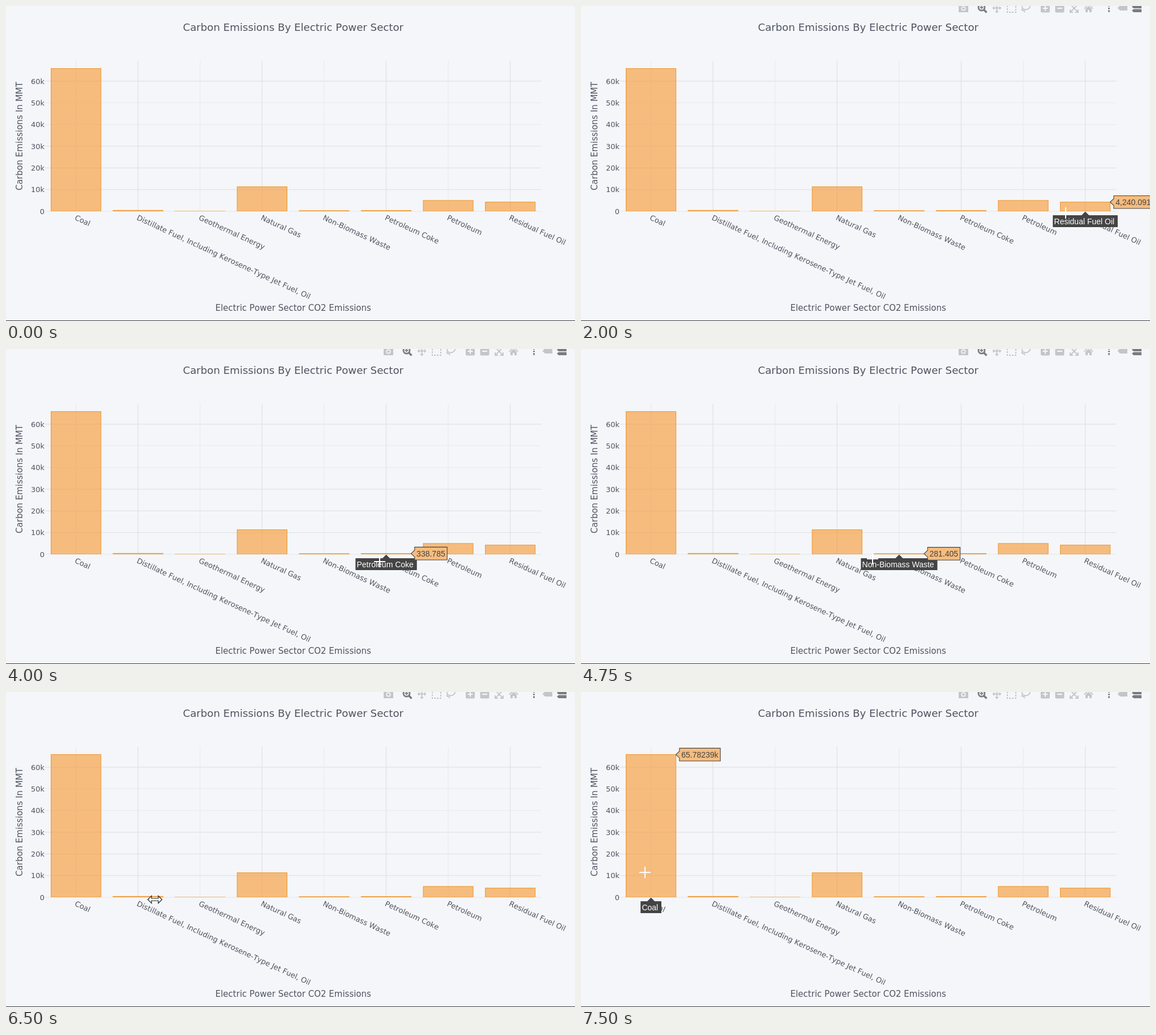
Write an HTML page that moves like this. It is 1005 px wide and 557 px high and loops after 8000 ms.

```html
<!DOCTYPE html>
<html lang="en">
<head>
<meta charset="utf-8">
<title>Carbon emissions chart</title>
<style>
  html, body { margin: 0; width: 100%; height: 100%; overflow: hidden; background: #f5f6f9; }
  svg { display: block; width: 1005px; height: 557px; }
  text { font-family: "DejaVu Sans", Verdana, sans-serif; font-kerning: none; fill: #4f5462; }
  .tick { font-size: 13px; }
  .axis { font-size: 15px; }
  .tip text { font: 14px "Liberation Sans", Arial, sans-serif; }
</style>
</head>
<body>
<svg id="stage" viewBox="0 0 1005 557">
  <clipPath id="plot"><rect x="68.7" y="97" width="876.7" height="266"/></clipPath>
  <rect width="1005" height="557" fill="#f5f6f9"/>
  <g id="grid"></g>
  <g id="bars" clip-path="url(#plot)"></g>
  <g id="labels">
    <text x="507.3" y="44" font-size="18.2" text-anchor="middle">Carbon Emissions By Electric Power Sector</text>
    <text class="axis" x="507.3" y="538.5" text-anchor="middle">Electric Power Sector CO2 Emissions</text>
    <text class="axis" transform="translate(28.8 230) rotate(-90)" text-anchor="middle">Carbon Emissions In MMT</text>
  </g>
  <rect y="556" width="1005" height="1" fill="#38393d"/>
  <g id="modebar" fill="#c4c5c9" stroke="none">
    <!-- camera -->
    <path d="M667-1h4l2-3h5l2 3h4v12h-17z"/>
    <circle cx="675.5" cy="4.5" r="3.2" fill="#c4c5c9" stroke="#f5f6f9" stroke-width="1.8"/>
    <!-- zoom -->
    <g fill="none" stroke="#7a7b80" stroke-width="2.6">
      <circle cx="707.5" cy="2.5" r="5.6"/>
      <path d="M711.5 6.5l5 5" stroke-width="3.4"/>
      <path d="M704.5 2.5h6M707.5-.5v6" stroke-width="1.8"/>
    </g>
    <!-- pan -->
    <path d="M726.5 3.5l3.5-3.5v2.5h3.5v-7h2v7h3.5v-2.5l3.5 3.5-3.5 3.5v-2.5h-3.5v4.5h2.5l-3.5 3.5-3.5-3.5h2.5v-4.5h-3.5v2.5z"/>
    <!-- box select -->
    <rect x="753" y="-5" width="15" height="16" fill="none" stroke="#c4c5c9" stroke-width="2" stroke-dasharray="3 2"/>
    <!-- lasso -->
    <path d="M780 4c-3-6 3-10 8-9 6 1 7 7 2 10-3 2-6 2-9 0-3-1-3 3 0 3 2 0 3 1 2 3" fill="none" stroke="#c4c5c9" stroke-width="1.8"/>
    <!-- zoom in, zoom out -->
    <rect x="812" y="-4" width="16" height="15.5" rx="2"/>
    <path d="M815.5 4h9M820-.5v9" stroke="#f5f6f9" stroke-width="2.2"/>
    <rect x="837.5" y="-4" width="16" height="15.5" rx="2"/>
    <path d="M841 4h9" stroke="#f5f6f9" stroke-width="2.2"/>
    <!-- autoscale -->
    <path d="M865-2l12 12M877-2l-12 12M864 6v5h5M873 11h5v-5" fill="none" stroke="#c4c5c9" stroke-width="1.8"/>
    <!-- home -->
    <path d="M888 4l8.5-8 8.5 8-1.2 1.2-7.3-6.8-7.3 6.8zM891 5l5.5-5 5.5 5v6h-4v-4h-3v4h-4z"/>
    <!-- spikes, hover modes -->
    <path d="M931-4h3v5h-3zM931 3h3v2.5h-3zM931 7.5h3v3h-3z" fill="#7a7b80"/>
    <path d="M947.5 3.5l4.5-4.5h13v9h-13z"/>
    <path d="M973 1.5l3-3h14v5.5h-14zM973 8l3-2.5h14v5.5h-14z" fill="#7a7b80"/>
  </g>
  <g id="tip" class="tip">
    <path id="nameBox" fill="#444"/>
    <text id="nameText" y="385.5" style="fill:#fff" text-anchor="middle"/>
    <path id="valueBox" fill="#f6bc7f" stroke="#444" stroke-width="1.1"/>
    <text id="valueText" style="fill:#444"/>
  </g>
  <path id="cross" d="M-10 0h20M0-10v20" fill="none" stroke="#fff" stroke-width="2"/>
  <path id="resize" d="M-12.5 0L-6-6.5V-2H6V-6.5L12.500 0 6 6.500V2H-6V6.500Z" fill="#fff" stroke="#222" stroke-width="1.2"/>
</svg>
<script>
const LOOP = 8000, LEFT = 68.7, RIGHT = 945.4, TOP = 97, BASE = 363, STEP = 109.58, HALF = 44;
const fuels = [
  ["Coal", 65782.39, "65.78239k"],
  ["Distillate Fuel, Including Kerosene-Type Jet Fuel, Oil", 404, "404.117"],
  ["Geothermal Energy", 10, "10.197"],
  ["Natural Gas", 11295.36, "11.29536k"],
  ["Non-Biomass Waste", 281, "281.405"],
  ["Petroleum Coke", 338.785, "338.785"],
  ["Petroleum", 4982.993, "4,982.993"],
  ["Residual Fuel Oil", 4240, "4,240.091"]
];

// time, x, y, cursor, hovered bar
const steps = [
  [750, 990, 390, "resize"], [1000, 948, 382, "resize"], [1250, 905, 374, "resize"],
  [1500, 884, 364, "cross", 7], [1750, 870, 362, "cross", 7],
  [2000, 856, 366, "cross", 7], [2250, 836, 370, "cross", 7],
  [2500, 815, 372, "cross", 6], [2750, 804, 372, "cross", 6], [3000, 684, 374, "cross", 6],
  [3250, 667, 376, "cross", 5], [3500, 661, 376, "cross", 5], [4000, 660, 376, "cross", 5],
  [4250, 605, 374, "cross", 4], [4500, 560, 372, "cross", 4], [4750, 515, 371, "cross", 4],
  [5000, 470, 371, "cross", 3], [5250, 428, 372, "cross", 3], [5500, 404, 372, "cross", 3],
  [5750, 365, 370, "cross", 2], [6000, 318, 368, "cross", 2],
  [6250, 263, 367, "resize"], [6500, 263, 367, "resize"],
  [6750, 218, 356, "cross"], [7000, 163, 338, "cross", 0],
  [7250, 128, 325, "cross", 0], [7500, 113, 319, "cross", 0]
];

const $ = id => document.getElementById(id);
const midX = i => 123.6 + i * STEP;
const valY = v => BASE - v * 38.36 / 10000;

function add(parent, tag, attrs, text) {
  const el = document.createElementNS("http://www.w3.org/2000/svg", tag);
  for (const k in attrs) el.setAttribute(k, attrs[k]);
  if (text) el.textContent = text;
  return $(parent).appendChild(el);
}

function gridLine(d, strong) {
  add("grid", "path", { d, stroke: strong ? "#e0e2e7" : "#e9ebf0", "stroke-width": 1.3 });
}

for (let k = 0; k < 7; k++) {
  const y = valY(k * 10000);
  gridLine(`M${LEFT} ${y}H${RIGHT}`, k % 3 === 0 ? k > 0 : k < 3);
  add("labels", "text", { class: "tick", x: 68, y: y + 4.7, "text-anchor": "end" }, k ? k * 10 + "k" : "0");
}
fuels.forEach(([name, value], i) => {
  const x = midX(i), y = valY(value);
  gridLine(`M${x} ${TOP}V${BASE}`, i % 2);
  add("bars", "rect", {
    x: x - HALF, y, width: HALF * 2, height: BASE - y,
    fill: "rgba(247,150,45,.6)", stroke: "#ee9d3e", "stroke-width": 1.2
  });
  add("labels", "text", { class: "tick", transform: `translate(${x - 3.2} 377.5) rotate(24.8)` }, name);
});

function showTip(i) {
  const on = i !== undefined;
  $("tip").style.display = on ? "" : "none";
  if (!on) return;
  const [name, value, label] = fuels[i], x = midX(i), y = valY(value);
  $("nameText").textContent = name;
  $("nameText").setAttribute("x", x - 1.8);
  const w = $("nameText").getComputedTextLength() / 2 + 4;
  $("nameBox").setAttribute("d", `M${x} 363.5l6.5 6.5H${x + w}V391H${x - w}V370H${x - 6.5}Z`);
  const tip = x + HALF, left = tip + 6.3;
  $("valueText").textContent = label;
  $("valueText").setAttribute("x", left + 3.3);
  $("valueText").setAttribute("y", y + 5.2);
  const right = left + $("valueText").getComputedTextLength() + 6.8;
  $("valueBox").setAttribute("d",
    `M${tip} ${y}L${left} ${y - 6}V${y - 11.3}H${right}V${y + 11.3}H${left}V${y + 6}Z`);
}

let shown = null;
function draw(now) {
  const t = now % LOOP;
  const step = steps.filter(s => s[0] <= t).pop();
  if (step === shown) return;
  shown = step;
  const [, x, y, kind, bar] = step || [];
  $("modebar").style.display = step ? "" : "none";
  for (const id of ["cross", "resize"]) {
    $(id).style.display = id === kind ? "" : "none";
    if (step) $(id).setAttribute("transform", `translate(${x} ${y})`);
  }
  showTip(bar);
}

const start = performance.now();
function tick() {
  draw(performance.now() - start);
  requestAnimationFrame(tick);
}
tick();
</script>
</body>
</html>
```
